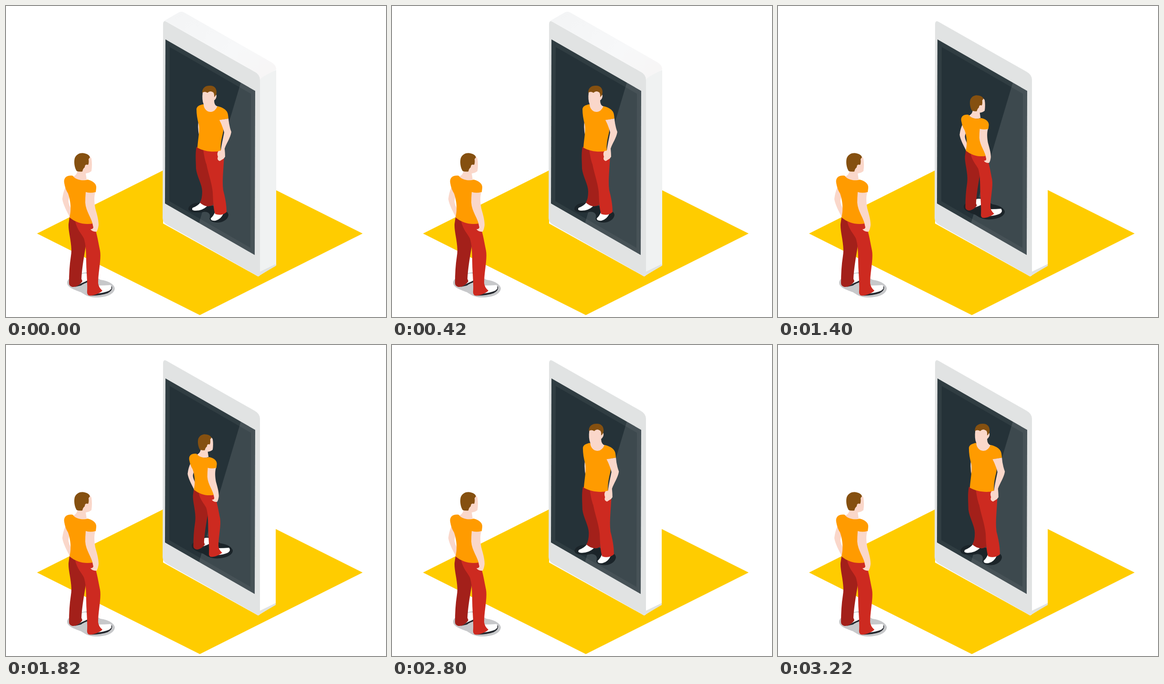
Recreate the animation shown at these times as an HTML page. Size 796 px wide and 652 px high, loop 3.5 s.

```html
<!DOCTYPE html>
<html lang="en">
<head>
<meta charset="utf-8">
<title>Mirror</title>
<style>
  html, body { margin: 0; width: 100%; height: 100%; overflow: hidden; background: #fff; }
  svg { display: block; width: 100%; height: 100%; }
  .skin { fill: #fad7ca; }
  .hair { fill: #855010; }
  .shirt { fill: #ff9b00; }
  .red { fill: #cd2a20; }
  .dark { fill: #a3201a; }
  .sole { fill: #23262c; }
  .white { fill: #fff; }
  .shadow { fill: var(--shadow); }
</style>
</head>
<body>
<svg viewBox="0 0 796 652">
  <defs>
    <linearGradient id="top" x1="0" y1="0" x2="1" y2="1">
      <stop stop-color="#f3f4f5"/><stop offset=".6" stop-color="#f7f8f9"/><stop offset="1" stop-color="#f7f5f5"/>
    </linearGradient>
    <clipPath id="glass"><path d="M334 70L522 178L521 522L333 414Z"/></clipPath>

    <g id="back">
      <path class="shadow" d="M128 580C128 570 148 561 169 558C182 562 190 570 198 574C215 576 227 584 228 592C227 605 208 611 190 611C172 611 165 605 157 600C140 594 128 589 128 580Z"/>
      <path class="sole" d="M144 589L174 573L174 578Q164 581 157 586Z"/>
      <path class="white" d="M157 562Q166 559 172 562L174 573Q166 579 154 582Z"/>
      <path class="dark" d="M133 443L172 462Q169 492 166 510C162 533 159 553 158 572L160 577C155 584 147 590 139 589Q132 587 132 581C132 562 133 543 136 524C140 501 130 475 131 457Z"/>
      <path class="sole" d="M172 602L222 588Q224 596 213 602Q197 608 174 607Z"/>
      <path class="white" d="M192 586Q207 586 219 585Q224 592 216 597Q204 602 188 603Z"/>
      <path class="red" d="M145 452L182 454C190 472 193 494 197 513C200 530 193 558 193 581Q194 590 202 597C195 603 183 608 174 607Q169 605 170 597C171 578 168 555 168 534C168 510 166 495 163 487C158 477 149 469 145 452Z"/>
      <path class="skin" d="M125 379C120 390 119 397 118 405C120 417 128 432 135 445L138 430C135 422 130 414 131 407Q133 401 134 393Z"/>
      <path class="skin" d="M150 343Q150 353 141 358Q151 369 169 364L167 351Q175 350 179 346Q181 332 179 320Q176 314 168 315Z"/>
      <path class="shirt" d="M122 371C120 360 128 354 140 356C146 365 161 367 171 364C184 367 190 374 189 382L188 390L184 392C181 408 186 436 182 456C166 459 148 456 133 443C138 424 134 404 130 393Q124 384 122 371Z"/>
      <path class="skin" d="M167 390Q178 393 187 390C184 401 185 412 187 424C190 435 194 447 194 459Q193 468 190 473Q181 474 177 468Q185 468 182 460C181 447 167 431 166 412Q166 402 167 390Z"/>
      <path class="hair" d="M148 346C143 338 142 326 144 319C148 309 158 307 165 309Q174 311 176 317L173 321Q174 329 172 333Q165 331 165 338Q161 341 160 347Q153 348 148 346Z"/>
    </g>

    <g id="front">
      <path class="shadow" d="M382 425C383 416 397 411 410 413L433 419C453 425 466 430 466 438C465 448 453 455 440 454Q424 452 427 443C429 436 423 430 413 432C399 435 382 433 382 425Z"/>
      <path class="white" d="M407 412Q402 419 391 423Q387 428 395 429Q410 430 421 420Z"/>
      <path class="white" d="M438 431Q435 440 429 445Q428 451 439 450Q450 447 455 436Z"/>
      <path class="dark" d="M399 295C396 311 398 327 398 341C400 358 411 374 411 389Q411 405 406 412Q413 419 423 420Q429 420 434 417L434 390L437 310Z"/>
      <path class="red" d="M413 300C415 315 417 324 420 332C424 353 431 370 433 390C434 408 434 423 438 436Q452 441 462 432C462 416 459 401 455 386C452 362 457 336 457 302Z"/>
      <path class="skin" d="M403 242Q401 258 405 275L407 240Z"/>
      <path class="skin" d="M412 181Q410 197 414 206Q411 219 428 225Q441 221 444 211Q436 209 436 198Q441 194 441 188L437 177L419 174Z"/>
      <path class="shirt" d="M399 216Q400 208 414 206C414 216 422 223 430 222Q438 221 443 210C456 213 464 219 465 228L466 236L449 239C454 248 457 257 454 268C450 284 449 295 450 304C433 307 415 305 401 297C402 280 406 262 404 249Q399 232 399 216Z"/>
      <path class="skin" d="M447 239L466 236Q467 251 472 264C470 277 462 287 458 299Q459 309 459 316L456 320L448 325Q441 323 444 316Q441 309 445 304L450 303C452 288 455 276 457 265Q453 250 447 239Z"/>
      <path class="hair" d="M411 182C411 171 418 167 427 167C437 167 441 173 441 181Q441 187 436 191Q437 181 432 180Q427 177 422 182Q416 178 411 182Z"/>
    </g>
  </defs>

  <path fill="#fc0" d="M65 477L406 306L747 477L406 648Z"/>
  <path class="white" d="M329 34L366 12L560 121L565 135L565 544L528 567L329 456Z"/>
  <g id="solid">
    <path fill="url(#top)" d="M329 36Q330 31 335 29L361 14Q367 10 374 14L556 118Q566 124 566 133L533 154L520 137L335 32Z"/>
    <path fill="#f0f2f2" d="M531 155Q536 148 566 134L566 544L531 560Z"/>
  </g>
  <path fill="#dfe2e2" d="M527 567L565 545L565 541L532 557Z"/>
  <path fill="#e1e3e3" d="M329 37Q330 30 336 33L521 138Q532 144 532 155L532 565Q529 568 525 565L338 459Q328 453 328 445Z"/>

  <g clip-path="url(#glass)">
    <path fill="#303d42" d="M330 60H530V530H330Z"/>
    <path fill="#253238" d="M343 86L513 184L512 507L342 409Z"/>
    <path fill="#fff" fill-opacity=".11" d="M495 150L404 456L530 530V150Z"/>
    <use id="reflection" style="--shadow:#1b2429"/>
  </g>
  <use href="#back" style="--shadow:#c7c8ca"/>
</svg>
<script>
  const HOLD = 700;
  const poses = [
    { view: "front", place: "", solid: true },
    { view: "back", place: "matrix(-.86 0 0 .86 578 -78)" },
    { view: "back", place: "matrix(.86 0 0 .86 279 -78)" },
    { view: "front", place: "matrix(-1 0 0 1 848.5 0)", solid: true },
    { view: "front", place: "matrix(1.033 0 0 1.033 -12.3 -7.5)" }
  ];
  const reflection = document.getElementById("reflection");
  const solid = document.getElementById("solid");
  let shown;

  function draw(now) {
    const pose = poses[Math.floor(now / HOLD) % poses.length];
    if (pose !== shown) {
      shown = pose;
      reflection.setAttribute("href", "#" + pose.view);
      reflection.setAttribute("transform", pose.place);
      solid.style.display = pose.solid ? "" : "none";
    }
    requestAnimationFrame(draw);
  }
  draw(performance.now());
</script>
</body>
</html>
```
